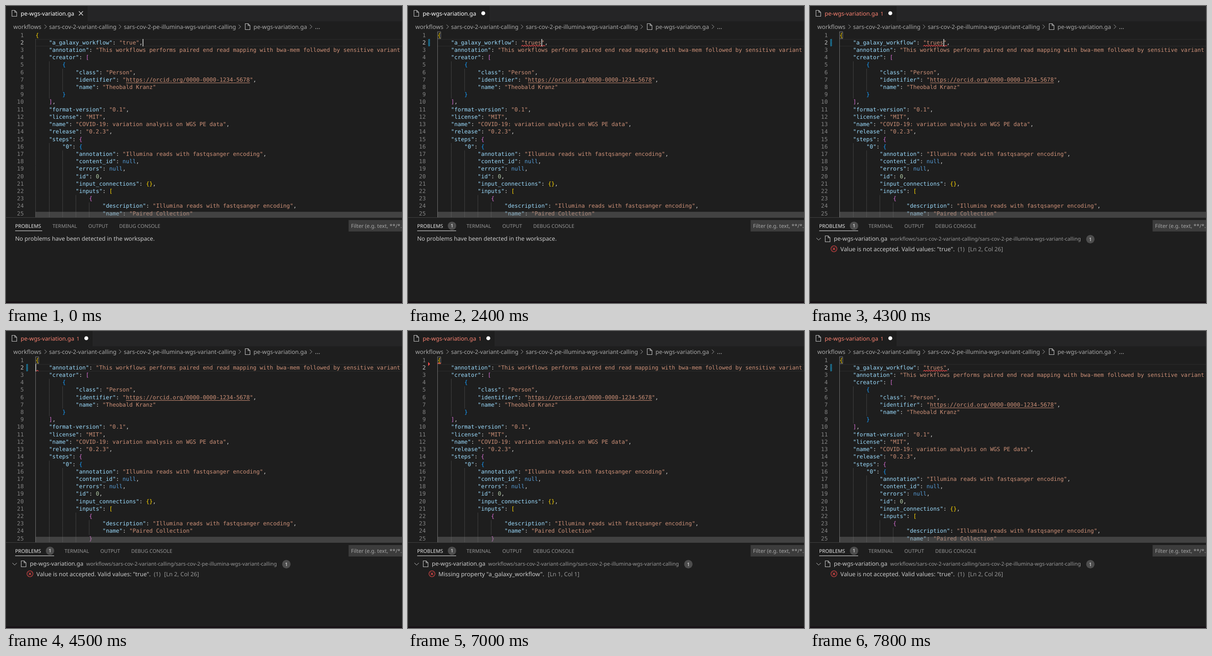
Write an HTML page that moves like this. It is 864 px wide and 648 px high and loops after 8 s.

```html
<!DOCTYPE html>
<html lang="en">
<head>
<meta charset="utf-8">
<title>Editor validation</title>
<style>
  html, body { margin: 0; width: 100%; height: 100%; overflow: hidden; background: #1e1e1e; }
  svg { display: block; width: 864px; height: 648px; }
  text { white-space: pre; text-rendering: geometricPrecision; font-family: "Noto Sans", "Open Sans", sans-serif; }
  .code { font: 12.142px "DejaVu Sans Mono", monospace; }
</style>
</head>
<body>
<svg id="stage" viewBox="0 0 864 648" xmlns="http://www.w3.org/2000/svg"></svg>
<script>
const LOOP = 8000;
const X0 = 64.4, CW = 7.31, ROW = 16.21, TOP = 55.8, BASE = 67.6;
const KEY = '#9cdcfe', STR = '#ce9178', PLAIN = '#d4d4d4', NULL = '#569cd6', NUM = '#b5cea8';
const BRACKETS = ['#ffd700', '#da70d6', '#179fff'];
const RED = '#f14c4c', ERROR = '#f88070', TEXT = '#cccccc', DIM = '#979797', CRUMB = '#a9a9a9';
const FILE = 'pe-wgs-variation.ga';
const DIRS = ['workflows', 'sars-cov-2-variant-calling', 'sars-cov-2-pe-illumina-wgs-variant-calling'];

const SOURCE = `{
    "a_galaxy_workflow": "true",
    "annotation": "This workflows performs paired end read mapping with bwa-mem followed by sensitive variant
    "creator": [
        {
            "class": "Person",
            "identifier": "https://orcid.org/0000-0000-1234-5678",
            "name": "Theobald Kranz"
        }
    ],
    "format-version": "0.1",
    "license": "MIT",
    "name": "COVID-19: variation analysis on WGS PE data",
    "release": "0.2.3",
    "steps": {
        "0": {
            "annotation": "Illumina reads with fastqsanger encoding",
            "content_id": null,
            "errors": null,
            "id": 0,
            "input_connections": {},
            "inputs": [
                {
                    "description": "Illumina reads with fastqsanger encoding",
                    "name": "Paired Collection"
                }`.split('\n');

const rect = (x, y, w, h, fill) => `<rect x="${x}" y="${y}" width="${w}" height="${h}" fill="${fill}"/>`;
const text = (x, y, str, fill, size = 12.57, extra = '') =>
  `<text x="${x}" y="${y}" fill="${fill}" font-size="${size}" ${extra}>${str}</text>`;
const line = (d, stroke, width = 1) => `<path d="${d}" fill="none" stroke="${stroke}" stroke-width="${width}"/>`;

const fileIcon = (x, y) => line(`M${x} ${y}h6.2l4.2 4.2v8.8h-10.4zM${x + 6.2} ${y}v4.2h4.2`, '#c5c5c5', 1.1);
const chevron = (x, y) => line(`M${x - 2} ${y - 4.5}l4.5 4.5l-4.5 4.5`, CRUMB);
const badge = (x, y) => `<circle cx="${x}" cy="${y}" r="9.2" fill="#4d4d4d"/>` +
  text(x, y + 3.8, '1', '#fff', 10.5, 'text-anchor="middle"');

function squiggle(col, row, chars) {
  const x = X0 + col * CW, end = x + chars * CW;
  let d = `M${x} ${TOP + (row + 1) * ROW - 0.3}`;
  for (let i = 0; x + i * 2.6 < end; i++) d += `l2.6 ${i % 2 ? 2.4 : -2.4}`;
  return line(d, RED, 1.1);
}

// Colours one code line; depth carries the bracket nesting between lines.
function paint(str, state) {
  const tokens = str.match(/"[^"]*"?|null|\d+|[{}[\]]|[^"{}[\]\dn]+/g) || [];
  return tokens.map((tok, i) => {
    let fill = PLAIN;
    if (tok[0] === '"') fill = (tokens[i + 1] || '')[0] === ':' ? KEY : STR;
    else if (tok === 'null') fill = NULL;
    else if (/^\d/.test(tok)) fill = NUM;
    else if (/[{[]/.test(tok)) fill = BRACKETS[state.depth++ % 3];
    else if (/[}\]]/.test(tok)) fill = BRACKETS[--state.depth % 3];
    return `<tspan fill="${fill}">${tok}</tspan>`;
  }).join('');
}

function doc(lines, rawRows = []) {
  const state = { depth: 0 };
  let guides = '', out = '';
  lines.slice(0, 25).forEach((full, row) => {
    const str = full.trimStart(), indent = full.length - str.length;
    const y = BASE + row * ROW;
    for (let col = 0; col < indent; col += 4)
      guides += rect(Math.round(X0 + col * CW), TOP + row * ROW, 1, ROW + 0.1, '#404040');
    const body = rawRows.includes(row) ? str : paint(str, state);
    out += `<text class="code" x="${X0 + indent * CW}" y="${y}" fill="${PLAIN}">${body}</text>`;
    const url = full.match(/https:[^"]+/);
    if (url) out += rect(X0 + url.index * CW, y + 2.4, url[0].length * CW, 1, STR);
  });
  return guides + out;
}

function tab(kind) {
  const bad = kind === 'error', width = bad ? 189 : 178;
  let out = rect(0, 0, width, 33.5, '#1e1e1e') + fileIcon(13, 9.5) +
    text(32, 20.8, FILE, bad ? ERROR : '#fff');
  if (bad) out += text(153.8, 20.6, '1', ERROR, 11.5);
  return out + (kind === 'clean'
    ? line('M159 11.5l9 9m0 -9l-9 9', '#e0e0e0', 1.2)
    : `<circle cx="${bad ? 175.2 : 164.2}" cy="15.8" r="4.3" fill="#fff"/>`);
}

function panelTabs(count) {
  const shift = count ? 26.2 : 0, y = 483.6, size = 10.9;
  return text(20, y, 'PROBLEMS', '#e7e7e7', size) + (count ? badge(96, 479.6) : '') +
    rect(20, 490, count ? 85 : 59, 1, '#e7e7e7') +
    [[101.5, 'TERMINAL'], [179.5, 'OUTPUT'], [247, 'DEBUG CONSOLE']]
      .map(([x, label]) => text(x + shift, y, label, DIM, size)).join('');
}

const problem = notes => line('M14 506l4.8 4.8l4.8 -4.8', '#c5c5c5') + fileIcon(33.3, 501.5) +
  text(52, 512.4, FILE, TEXT) + text(175, 512.2, DIRS.join('/'), DIM, 11.34) + badge(611.7, 508.8) +
  `<circle cx="52.3" cy="529.8" r="6.5" fill="none" stroke="${RED}" stroke-width="1.1"/>` +
  line('M49.6 527.1l5.4 5.4m0 -5.4l-5.4 5.4', RED, 1.1) +
  notes.map(([x, str], i) => text(x, 535, str, i ? DIM : TEXT, i ? 12.55 : 12.77)).join('');

const hatch = () => {
  let d = '';
  for (let y = 70; y < 92; y += 3.4) d += `M43.5 ${y + 2.6}l5 -5`;
  return `<g clip-path="url(#strip)">${line(d, '#1b81a8', 1.7)}</g>`;
};

const longer = SOURCE.map((s, i) => i === 1 ? s.replace('true', 'trues') : s);
const cut = SOURCE.filter((s, i) => i !== 1);
const wrongValue = problem([[66.3, 'Value is not accepted. Valid values: "true".'], [322.5, '(1)'], [345, '[Ln 2, Col 26]']]);
const missing = problem([[66.3, 'Missing property "a_galaxy_workflow".'], [305, '[Ln 1, Col 1]']]);
const caret = col => rect(Math.round(X0 + col * CW), 72, 1.7, 16.2, '#c4c5c3');
const valueMark = squiggle(25, 1, 7), braceMark = squiggle(0, 0, 1);
const enclosing = rect(64, 72, 1, 389, '#707070') +
  '<rect x="64.5" y="56.3" width="6.8" height="14.8" fill="none" stroke="#888" stroke-width=".9"/>';
const deleted = `<path d="M44 67.5v9l4 -4.5z" fill="${RED}"/>`;
const at32 = caret(32), at31 = caret(31), at0 = caret(0);
const trues = doc(longer);

// Each track: [start in ms, markup] steps, held until the next one.
const tracks = {
  tab: [[0, tab('clean')], [2200, tab('dirty')], [2800, tab('error')]],
  doc: [[0, doc(SOURCE)], [2100, trues], [4500, doc(cut)], [7300, doc(longer, [1, 2])], [7400, trues]],
  scope: [[0, ''], [1800, enclosing]],
  gutter: [[0, ''], [2400, hatch()], [4700, deleted], [7500, hatch()]],
  marks: [[0, ''], [2400, valueMark], [4500, squiggle(0.2, 1, 0.7)], [4700, braceMark], [7500, valueMark]],
  caret: [[0, at32], [500, ''], [1000, at32], [1500, ''], [1700, at31], [1900, caret(30)],
    [2100, at31], [2800, ''], [3300, at31], [3800, ''], [4300, at31], [4500, at0], [5000, ''],
    [5500, at0], [6000, ''], [6500, at0], [7000, ''], [7300, at31], [7800, '']],
  heads: [[0, panelTabs(0)], [2400, panelTabs(1)]],
  panel: [[0, text(20, 512.4, 'No problems have been detected in the workspace.', TEXT, 12.64)],
    [2800, wrongValue], [4800, missing], [7600, wrongValue]]
};

const slot = name => `<g id="${name}"></g>`;
const numbers = SOURCE.slice(0, 25).map((s, i) =>
  `<text class="code" x="38.7" y="${BASE + i * ROW}" text-anchor="end" fill="${i === 1 ? '#c6c6c6' : '#858585'}">${i + 1}</text>`).join('');
const crumbs = text(16, 49.6, DIRS[0], CRUMB, 12.75) + chevron(86, 45.2) +
  text(94, 49.6, DIRS[1], CRUMB) + chevron(248.5, 45.2) +
  text(257, 49.6, DIRS[2], CRUMB) + chevron(509.5, 45.2) +
  fileIcon(522, 38.5) + text(540, 49.6, FILE, CRUMB) + chevron(665, 45.2) + text(674, 49.6, '…', CRUMB, 14.5);

const stage = document.getElementById('stage');
stage.innerHTML =
  '<clipPath id="strip"><rect x="44" y="72" width="4" height="16"/></clipPath>' +
  rect(0, 0, 864, 648, '#1e1e1e') + rect(0, 0, 864, 33.5, '#252526') + slot('tab') + crumbs +
  rect(64, 72, 800, 1.5, '#282828') + rect(64, 86.8, 800, 1.5, '#282828') +
  numbers + ['doc', 'scope', 'gutter', 'marks', 'caret'].map(slot).join('') +
  `<g opacity=".4">${rect(64, 449, 800, 12, '#797979')}</g>` +
  rect(0, 461, 864, 1, '#414141') + slot('heads') +
  rect(747.5, 467, 116.5, 25, '#3c3c3c') +
  text(752.7, 484, 'Filter (e.g. text, **/*.ts, !**/node_modules/**)', '#a6a6a6', 11.65) +
  slot('panel') + rect(0, 645, 864, 3, '#150e14');

const layers = Object.entries(tracks).map(([name, steps]) =>
  ({ node: document.getElementById(name), steps, shown: -1 }));

function draw(time) {
  for (const layer of layers) {
    const next = layer.steps.findLastIndex(([start]) => start <= time);
    if (next === layer.shown) continue;
    layer.shown = next;
    layer.node.innerHTML = layer.steps[next][1];
  }
}

const begin = performance.now();
function tick() {
  draw((performance.now() - begin) % LOOP);
  requestAnimationFrame(tick);
}
tick();
</script>
</body>
</html>
```
